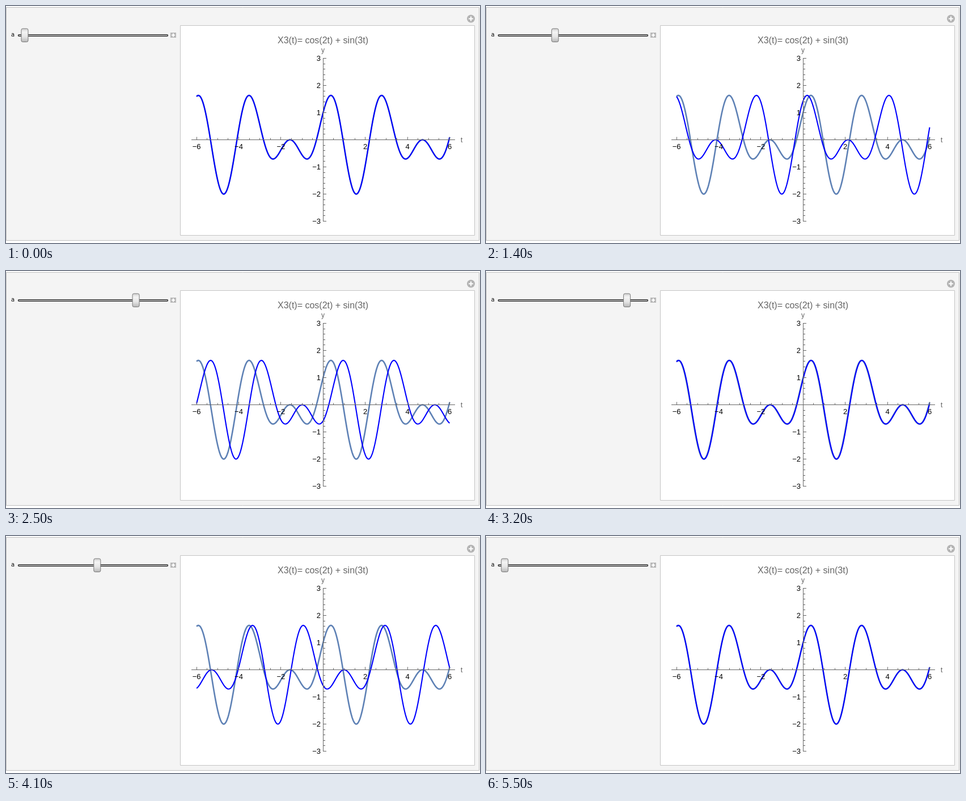
An HTML page with a canvas that plays this animation: 836x419 px, repeating every 6000 ms.

```html
<!DOCTYPE html>
<html lang="en">
<head>
<meta charset="utf-8">
<title>Shifted wave</title>
<style>
html, body { margin: 0; width: 100%; height: 100%; overflow: hidden; background: #fff; }
canvas { display: block; }
</style>
</head>
<body>
<canvas width="836" height="419"></canvas>
<script>
const ctx = document.querySelector("canvas").getContext("2d");
const SANS = '"Liberation Sans", Arial, sans-serif';
const AXIS = "#666";
const X0 = 559.3, Y0 = 236.5, UNIT_X = 37.2, UNIT_Y = 48;
const px = t => X0 + t * UNIT_X;
const py = y => Y0 - y * UNIT_Y;
const wave = t => Math.cos(2 * t) + Math.sin(3 * t);

function box(x, y, w, h, fill, stroke, radius = 0, lineWidth = 1) {
  ctx.beginPath();
  ctx.roundRect(x, y, w, h, radius);
  ctx.fillStyle = fill;
  ctx.fill();
  if (!stroke) return;
  ctx.strokeStyle = stroke;
  ctx.lineWidth = lineWidth;
  ctx.stroke();
}

function line(x1, y1, x2, y2) {
  ctx.beginPath();
  ctx.moveTo(x1, y1);
  ctx.lineTo(x2, y2);
  ctx.stroke();
}

function text(str, x, y, size, color, align = "center", family = SANS) {
  ctx.font = `${size}px ${family}`;
  ctx.fillStyle = color;
  ctx.textAlign = align;
  ctx.fillText(str, x, y);
}

function plus(x, y, arm) {
  ctx.strokeStyle = "#fff";
  ctx.lineWidth = 2;
  line(x - arm, y, x + arm, y);
  line(x, y - arm, x, y + arm);
}

function curve(shift, color, width) {
  ctx.beginPath();
  for (let i = 0; i <= 480; i++) {
    const t = -6 + i / 40;
    ctx.lineTo(px(t), py(wave(t + shift)));
  }
  ctx.strokeStyle = color;
  ctx.lineWidth = width;
  ctx.lineJoin = "round";
  ctx.stroke();
}

function axes() {
  const label = n => String(n).replace("-", "\u2212");
  const snap = v => Math.floor(v) + 0.5;
  ctx.strokeStyle = AXIS;
  ctx.lineWidth = 1;
  line(327, Y0, 792, Y0);
  line(559.5, 92, 559.5, 381);
  for (let i = -12; i <= 12; i++) {
    const x = snap(px(i / 2));
    line(x, Y0, x, Y0 - (i % 4 ? 3 : 5));
  }
  for (let i = -15; i <= 15; i++) {
    const y = snap(py(i / 5));
    line(559.5, y, 559.5 + (i % 5 ? 3.5 : 5.5), y);
  }
  for (const n of [-6, -4, -2, 2, 4, 6]) text(label(n), px(n), 253, 13, "#000");
  for (const n of [-3, -2, -1, 1, 2, 3]) text(label(n), 555, py(n) + 4.5, 13, "#000", "right");
  text("X3(t)= cos(2t) + sin(3t)", 559, 66, 16, AXIS);
  text("y", 559, 82, 12, AXIS);
  text("t", 803.5, 241, 13, AXIS);
}

function slider(a) {
  text("a", 9, 54, 10, "#000", "left", '"DejaVu Sans", sans-serif');
  box(21.5, 50.5, 264, 3, "#aaa", "#222", 1.5, 1.2);
  box(290, 47, 10, 9, "#b8b8b8");
  plus(295, 51.5, 3);
  const x = 27 + a * 34.4;
  const shade = ctx.createLinearGradient(0, 40, 0, 64);
  shade.addColorStop(0, "#d0d0d0");
  shade.addColorStop(0.25, "#f4f4f4");
  shade.addColorStop(0.6, "#e6e6e6");
  shade.addColorStop(1, "#b4b4b4");
  box(x, 40, 12, 23.5, shade, "#777", 2.5);
}

// The shift rises in equal steps, rests at the top, then returns.
function shiftAt(ms) {
  const n = Math.floor(ms / 100) - 4;
  const step = Math.min(n, 51 - n);
  return step < 1 ? 0 : 0.03 + 0.2835 * (step - 1);
}

function draw(now) {
  const a = shiftAt(now % 6000);
  box(0, 0, 836, 419, "#fff");
  box(0.5, 2.5, 834, 412, "#f4f4f4", "#bfbfbf");
  ctx.beginPath();
  ctx.arc(820, 22.5, 7, 0, 2 * Math.PI);
  ctx.fillStyle = "#b4b4b4";
  ctx.fill();
  plus(820, 22.5, 4);
  slider(a);
  box(307.5, 34.5, 519, 371, "#fff", "#c4c4c4");
  curve(0, "#5e81b5", 2.6);
  curve(a, "#00f", 2.1);
  axes();
  requestAnimationFrame(() => draw(performance.now()));
}
draw(0);
</script>
</body>
</html>
```
